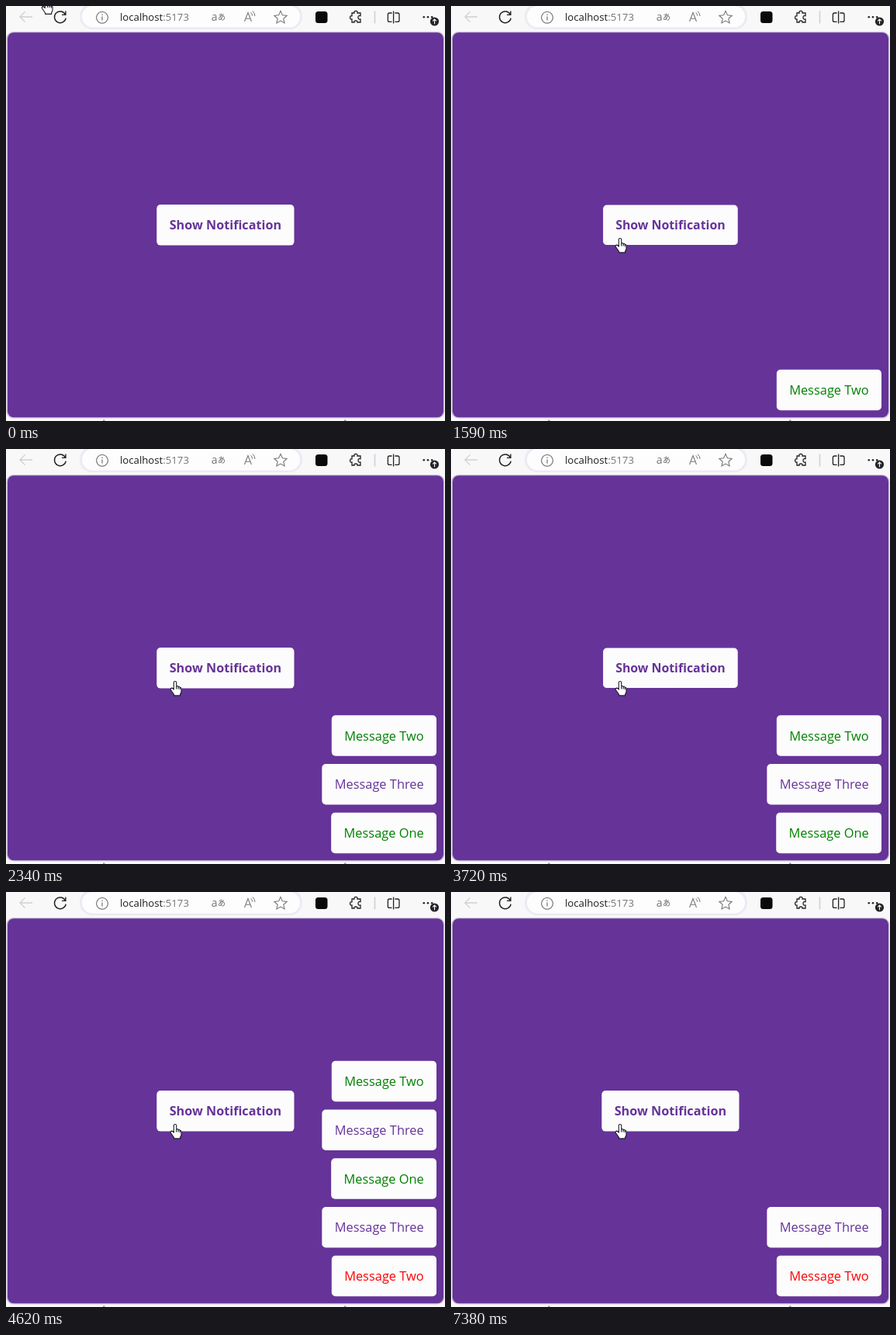
Animation, 566 px wide and 535 px high, one loop 8 s. Source, as an HTML page with a canvas:

```html
<!DOCTYPE html>
<html lang="en">
<head>
<meta charset="utf-8">
<title>Notifications</title>
<style>
  html, body { margin: 0; width: 100%; height: 100%; overflow: hidden; background: #f8f8f9; }
  canvas { display: block; width: 566px; height: 535px; }
</style>
</head>
<body>
<canvas id="stage"></canvas>
<script>
const W = 566, H = 535, LOOP = 8000;
const PURPLE = '#663399', GREEN = '#008000', RED = '#ff0000', CARD = '#fcfcfc';
const SANS = '"Open Sans", "Noto Sans", sans-serif';

// Each click: button down, button up (message appears), message removed
const clicks = [
  { down: 1070, up: 1180, end: 6240, text: 'Message Two', color: GREEN },
  { down: 1590, up: 1760, end: 6810, text: 'Message Three', color: PURPLE },
  { down: 2170, up: 2340, end: 7380, text: 'Message One', color: GREEN },
  { down: 3720, up: 3810, end: Infinity, text: 'Message Three', color: PURPLE },
  { down: 4540, up: 4620, end: Infinity, text: 'Message Two', color: RED }
];

// Pointer stops: time, x, y, shape
const stops = [
  [0, 52, -8, 'hand'], [60, 80, 45, 'arrow'], [147, 115, 115, 'arrow'],
  [233, 150, 185, 'arrow'], [320, 172, 229, 'arrow'], [500, 176, 250, 'arrow'],
  [580, 181, 278, 'arrow'], [660, 184, 300, 'arrow'], [820, 203, 300, 'hand'],
  [900, 218, 299.5, 'hand']
];

const pointers = {
  hand: new Path2D('M-1.7 10.6V1.6A1.7 1.6 0 0 1 1.7 1.6V6.4Q3.3 5.4 4.1 7Q5.6 6.2 6.3 8Q8 7.6 8 9.6V13Q8 15 6.6 16.5V18.4H-1.4V17Q-3 14.5 -5.4 11.2Q-6.4 9 -4.4 8.6Q-3 8.7 -1.7 10.6Z'),
  arrow: new Path2D('M0 0V16L3.8 12.6L6.3 18.4L8.8 17.3L6.3 11.7H11.4Z')
};
const knuckles = new Path2D('M1.7 6.4V10M4.1 7V10M6.3 8V10.4');

const canvas = document.getElementById('stage');
const ctx = canvas.getContext('2d');
const ratio = window.devicePixelRatio || 1;
canvas.width = W * ratio;
canvas.height = H * ratio;

function box(x, y, w, h, r, fill) {
  ctx.beginPath();
  ctx.roundRect(x, y, w, h, r);
  ctx.fillStyle = fill;
  ctx.fill();
}

function disc(x, y, r, fill) {
  ctx.beginPath();
  ctx.arc(x, y, r, 0, Math.PI * 2);
  ctx.fillStyle = fill;
  ctx.fill();
}

function line(path, color, width = 1.1) {
  ctx.strokeStyle = color;
  ctx.lineWidth = width;
  ctx.stroke(new Path2D(path));
}

function label(text, x, y, font, color, align = 'left') {
  ctx.font = font;
  ctx.fillStyle = color;
  ctx.textAlign = align;
  ctx.fillText(text, x, y);
}

function star(cx, cy, r) {
  ctx.beginPath();
  for (let i = 0; i < 10; i++) {
    const a = -Math.PI / 2 + i * Math.PI / 5;
    const d = i % 2 ? r * 0.47 : r;
    ctx.lineTo(cx + d * Math.cos(a), cy + d * Math.sin(a));
  }
  ctx.closePath();
  ctx.strokeStyle = '#777';
  ctx.lineWidth = 1.1;
  ctx.stroke();
}

function drawAddressBar() {
  box(95, -3, 287, 33, 16, '#ebebf3');
  box(98, 0, 281, 27.5, 13.5, '#fdfdfe');

  line('M124 7.5a7.3 7.3 0 1 0 .01 0', '#707070');
  line('M124 13.4V18.4', '#707070', 1.2);
  disc(124, 11.3, 0.8, '#707070');

  const font = `13.2px ${SANS}`;
  label('localhost', 147, 19, font, '#1c1c1c');
  label(':5173', 147 + ctx.measureText('localhost').width, 19, font, '#757575');

  label('a', 264.8, 18.5, `14px ${SANS}`, '#777');
  label('あ', 273, 17.6, '10px "Noto Sans CJK JP", "Noto Sans CJK", sans-serif', '#666');

  line('M307.5 20L312 8.6L316.5 20M309.1 16.2H314.9', '#777');
  line('M315.6 8.4Q317.6 9.8 317.6 12.6M318 6.6Q321 9 321 13', '#777', 1);
  star(354, 15, 8.6);
}

function drawToolbar() {
  line('M34 14H18M24.6 7.4L18 14L24.6 20.6', '#cfcfcf', 1.3);
  line('M76.5 11A7.4 7.4 0 1 0 77.2 15.6M76.9 6.6V11.4H72', '#222', 1.4);
  drawAddressBar();

  box(399, 7, 15.5, 15, 3.5, '#0a0a0a');
  line('M446 9H449Q448.4 6.4 451 6.4Q453.6 6.4 453 9H457V12.6Q454 12 454 14.8Q454 17.4 457 17V21H453Q453.5 19 451 19Q448.6 19 449 21H446V17Q443.6 17.4 443.6 14.8Q443.6 12.4 446 12.8Z', '#222', 1.3);
  line('M475.5 6.5V22.5', '#cfcfd8', 1.6);
  line('M497.6 9H494.4Q492.4 9 492.4 11V18.4Q492.4 20.4 494.4 20.4H497.6M501.4 9H505Q507 9 507 11V18.4Q507 20.4 505 20.4H501.4M499.6 6.6V22.6', '#222', 1.3);

  for (const x of [538.8, 544, 549.2]) disc(x, 14.2, 1.3, '#222');
  disc(552.5, 20, 5.6, '#22252a');
  line('M552.5 23.2V17.2M550.2 19.3L552.5 17L554.8 19.3', '#fff', 1.1);
}

function drawPage() {
  box(0.4, 33, 565, 498.6, 9, '#cbc4d8');
  box(2, 34.2, 562, 496.1, 8, PURPLE);
  for (const x of [125, 436]) box(x, 533.5, 2.5, 1.5, 0, '#9a9aa0');
}

function drawButton(pressed) {
  ctx.save();
  ctx.translate(282.9, 282.3);
  if (pressed) ctx.scale(0.98, 0.98);
  box(-88.6, -26.3, 177.2, 52.6, 5, CARD);
  label('Show Notification', 0, 6.1, `bold 16.2px ${SANS}`, PURPLE, 'center');
  ctx.restore();
}

function drawMessage({ text, color }, slot) {
  const font = `16.4px ${SANS}`;
  ctx.font = font;
  const width = ctx.measureText(text).width + 32.6;
  const x = 555 - width, y = 468.7 - slot * 62.75;
  box(x, y, width, 52.6, 5, CARD);
  label(text, x + 16.3, y + 32.4, font, color);
}

function drawPointer(t) {
  const [, x, y, shape] = stops.findLast(s => s[0] <= t);
  ctx.save();
  ctx.translate(x, y);
  ctx.lineJoin = 'round';
  ctx.lineWidth = 1.1;
  ctx.fillStyle = '#fff';
  ctx.strokeStyle = '#1b1b28';
  ctx.fill(pointers[shape]);
  ctx.stroke(pointers[shape]);
  if (shape === 'hand') ctx.stroke(knuckles);
  ctx.restore();
}

function draw(t) {
  ctx.setTransform(ratio, 0, 0, ratio, 0, 0);
  ctx.fillStyle = '#f8f8f9';
  ctx.fillRect(0, 0, W, H);
  drawToolbar();
  drawPage();
  drawButton(clicks.some(c => t >= c.down && t < c.up));
  clicks.filter(c => t >= c.up && t < c.end).reverse().forEach(drawMessage);
  drawPointer(t);
}

const start = performance.now();
function tick() {
  draw((performance.now() - start) % LOOP);
  requestAnimationFrame(tick);
}
tick();
</script>
</body>
</html>
```
